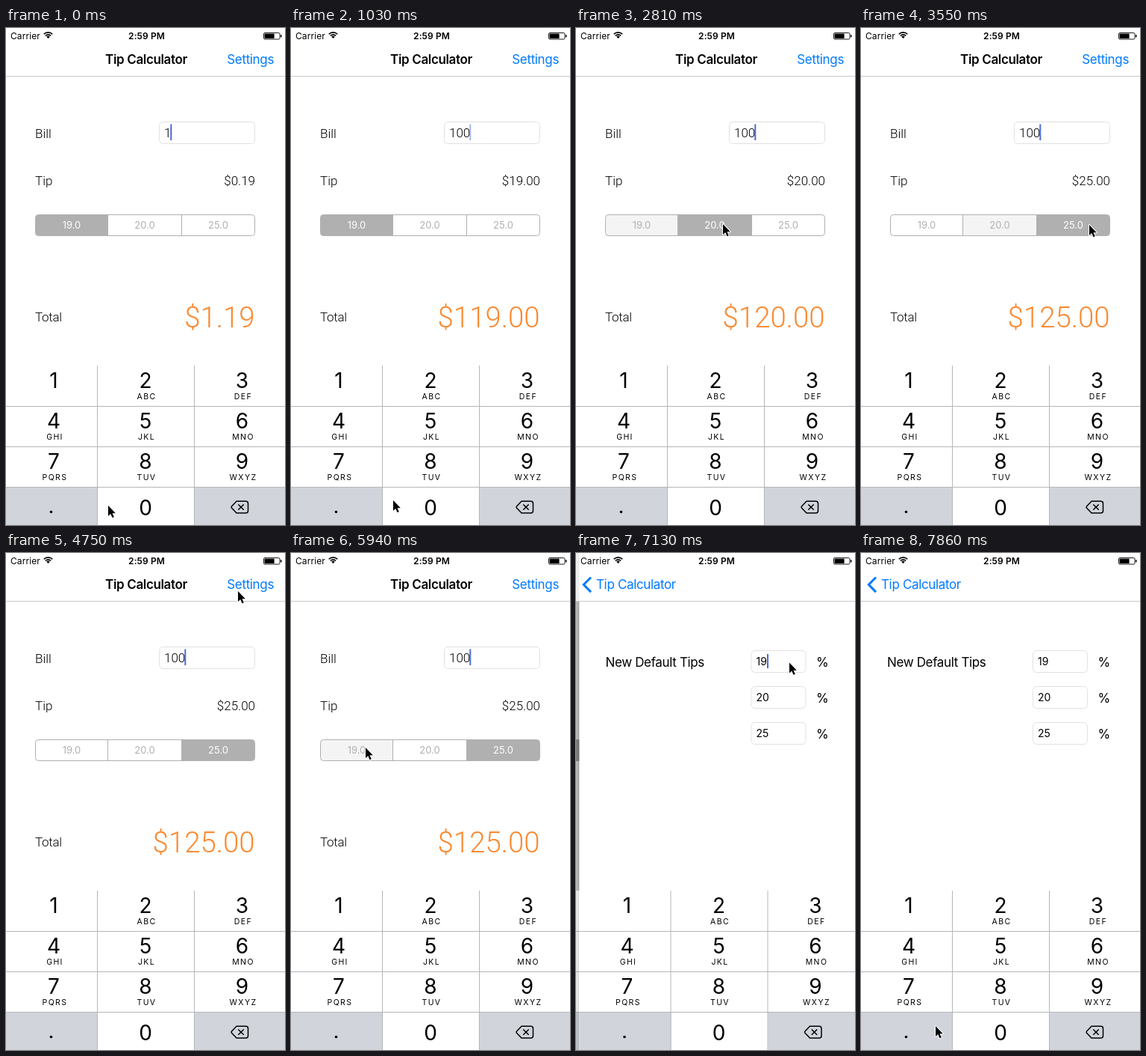
These frames come from a looping animation (374 px wide and 664 px high, 8 s). An HTML page:

```html
<!DOCTYPE html>
<html lang="en">
<head>
<meta charset="utf-8">
<title>Tip Calculator</title>
<style>
html, body { margin: 0; width: 100%; height: 100%; overflow: hidden; background: #fff; }
svg { display: block; width: 374px; height: 664px; }
text { font-family: Inter, sans-serif; white-space: pre; }
.nav { font-size: 17px; letter-spacing: -.35px; }
.bold { font-weight: 600; }
.status { font-size: 12px; letter-spacing: .1px; }
.thin { font-family: Roboto, sans-serif; font-weight: 300; font-size: 17px; }
.total { font-size: 38.4px; fill: #fa8a32; }
.seg { font-size: 13px; }
.key { font-size: 28px; }
.abc { font-size: 10.5px; letter-spacing: 1.4px; }
.small { font-size: 14px; }
.mid { text-anchor: middle; }
.end { text-anchor: end; }
</style>
</head>
<body>
<svg id="stage" viewBox="0 0 374 664" xmlns="http://www.w3.org/2000/svg"></svg>
<script>
const stage = document.getElementById('stage');
const W = 374, H = 664, LOOP = 8000, TICK = 148.3, LAST = 53;
const BLUE = '#007aff', GRAY = '#b0b0b0', KEY = '#d1d4db', PALE = '#f4f4f4';
const PUSH = 6757, STIFF = .01777;

// Pointer stops: tick, x, y
const stops = [
  [0, 137, 638], [2, 137, 631], [10, 137, 631], [11, 142, 600], [13, 168, 430],
  [15, 204, 279], [17, 197, 262], [19, 197, 262], [22, 300, 263], [24, 306, 263],
  [25, 306, 263], [28, 124, 262], [29, 124, 262], [32, 311, 51], [34, 349, 39],
  [36, 349, 39], [39, 100, 260], [41, 100, 260], [44, 324.5, 36], [46, 324.5, 36],
  [48, 286, 146.5], [53, 100, 632]
];
const rates = [19, 20, 25];
// Selections: tick, segment
const picks = [[0, 0], [18, 1], [23, 2], [41, 0]];

const clamp = v => Math.max(0, Math.min(1, v));
const text = (x, y, s, cls, extra = '') =>
  `<text x="${x}" y="${y}" class="${cls}" ${extra}>${s}</text>`;
const rect = (x, y, w, h, fill, extra = '') =>
  `<rect x="${x}" y="${y}" width="${w}" height="${h}" fill="${fill}" ${extra}/>`;
const path = (d, extra) => `<path d="${d}" ${extra}/>`;
const shift = (x, body) => `<g transform="translate(${x} 0)">${body}</g>`;
const field = (x, y, w) => rect(x, y, w, 29, '#fff', 'rx="5" stroke="#e1e1e1"');
const caret = (x, y, h, a) => rect(x, y, 2, h, '#4a6ad8', `opacity="${a}"`);

function pointer(k) {
  const i = Math.max(1, stops.findIndex(s => s[0] >= k));
  const [t0, x0, y0] = stops[i - 1], [t1, x1, y1] = stops[i];
  const u = (k - t0) / (t1 - t0);
  const at = `transform="translate(${x0 + (x1 - x0) * u} ${y0 + (y1 - y0) * u})"`;
  return path('M0 0V14L3.2 11L5.5 16.3L7.8 15.3L5.5 10.2H9.8Z',
    at + ' fill="#000" stroke="#fff" stroke-width="2" stroke-linejoin="round" paint-order="stroke"');
}

function keyboard(pressed) {
  const abc = ['', 'ABC', 'DEF', 'GHI', 'JKL', 'MNO', 'PQRS', 'TUV', 'WXYZ'];
  const cols = [64, 187, 316.5];
  let s = rect(0, 451, W, 213, '#fff') + rect(0, 614, 123, 50, KEY) + rect(253, 614, 121, 50, KEY);
  if (pressed) s += rect(123, 614, 130, 50, KEY);
  abc.forEach((label, i) => {
    const x = cols[i % 3], y = 480 + 54 * Math.floor(i / 3);
    s += text(x, y + .5, i + 1, 'key mid') + text(x + 1.5, y + 16, label, 'abc mid');
  });
  s += text(187, 650.5, 0, 'key mid') + `<circle cx="60.5" cy="646.5" r="1.8"/>`;
  s += path('M122.5 451V664M252.5 451V664M0 505.5H374M0 559.5H374M0 613.5H374',
    'stroke="#b4b6b9" fill="none"');
  s += path('M309 632.2H321.5Q324.5 632.2 324.5 635.2V645Q324.5 648 321.5 648H309L302.3 640.9Q301.8 640.1 302.3 639.3ZM311.3 636.5L318.7 643.7M318.7 636.5L311.3 643.7',
    'fill="none" stroke="#000" stroke-width="1.5" stroke-linejoin="round"');
  return s;
}

function shade(i, k, now) {
  const [start, seg] = picks[now], next = picks[now + 1];
  if (i === seg) return GRAY;
  if (now && i === picks[now - 1][1]) {
    if (k === start) return GRAY;
    if (k - start < 3) return PALE;
  }
  return next && next[1] === i && next[0] - k === 1 ? PALE : '#fff';
}

function segments(k, now) {
  const edges = [39.5, 136.5, 235.5, 333.5];
  let s = '<clipPath id="pill"><rect x="39.5" y="249.5" width="294" height="28" rx="4"/></clipPath>';
  let labels = '';
  rates.forEach((r, i) => {
    const fill = shade(i, k, now), x = edges[i], w = edges[i + 1] - x;
    s += rect(x, 249.5, w, 28, fill, 'clip-path="url(#pill)"');
    labels += text(x + w / 2, 268.3, r.toFixed(1), 'seg mid', `fill="${fill === GRAY ? '#fff' : GRAY}"`);
  });
  return s + rect(39.5, 249.5, 294, 28, 'none', `rx="4" stroke="${GRAY}"`)
    + path('M136.5 250V277M235.5 250V277', `stroke="${GRAY}"`) + labels;
}

function blink(k) {
  if (k < 7) return 1;
  if (k > 44) return 0;
  const phase = (k * TICK / 1000 - 1.03) % 1;
  return phase < .1 ? .5 : phase < .5 ? 0 : 1;
}

function calculator(k) {
  const digits = Math.min(3, k + 1), bill = 10 ** (digits - 1);
  const now = picks.filter(p => p[0] <= k).length - 1;
  const tip = bill * rates[picks[now][1]] / 100;
  return text(39, 147, 'Bill', 'thin') + text(39, 210, 'Tip', 'thin')
    + text(39, 392, 'Total', 'thin', 'letter-spacing="-.3"')
    + field(205.5, 125.5, 128) + text(212, 146, bill, 'thin')
    + caret(210.8 + 9.5 * digits, 128.5, 21.5, blink(k))
    + text(334, 210, '$' + tip.toFixed(2), 'thin end')
    + segments(k, now)
    + text(333.5, 399.7, '$' + (bill + tip).toFixed(2), 'thin total end');
}

function settings(k) {
  let s = rect(0, 0, W, H, '#fff') + text(35, 151.5, 'New Default Tips', 'nav');
  rates.forEach((r, i) => {
    const y = 130.5 + 48 * i;
    s += field(230.5, y, 73) + text(237, y + 19.5, r, 'small') + text(317.5, y + 21, '%', 'nav');
  });
  s += caret(251.5, 135, 19, k < 50 ? 1 : k < 51 ? .5 : 0);
  return s + (k > 46 ? keyboard(false) : '');
}

function statusBar() {
  const wave = r => `M${56.5 - r * .72} ${14 - r * .72}A${r} ${r} 0 0 1 ${56.5 + r * .72} ${14 - r * .72}`;
  return text(6, 14.5, 'Carrier', 'status') + text(188.5, 14.5, '2:59 PM', 'status bold mid')
    + path(wave(8) + wave(5), 'fill="none" stroke="#000" stroke-width="1.7"')
    + path('M56.5 14L54.2 11.6A3.2 3.2 0 0 1 58.8 11.6Z', '')
    + rect(345.5, 6.5, 21.5, 8.5, 'none', 'rx="1.5" stroke="#000" stroke-width=".9"')
    + rect(346.6, 7.6, 13, 6.3, '#000') + rect(368, 9, 1.5, 3.5, '#000', 'rx=".7"');
}

function navBar(k, p) {
  const name = 'Tip Calculator';
  const link = k < 44 ? 1 : Math.min(.3, clamp(1 - 3 * p));
  let s = path('M0 64.5H374', 'stroke="#c9c9c9"');
  s += text(188 - 107 * p ** 1.22, 48, name, 'nav bold mid', `opacity="${clamp(1 - 1.75 * p)}"`);
  s += text(359, 48, 'Settings', 'nav end', `fill="${p ? '#888' : BLUE}" opacity="${link}"`);
  if (p) {
    s += path('M20 32.5L10.3 42.3L20 52.1',
      `fill="none" stroke-width="3" stroke="${p < .5 ? '#888' : BLUE}" opacity="${clamp(p < .5 ? p / 3 : p)}"`);
    s += text(27, 48, name, 'nav', `fill="${BLUE}" opacity="${clamp((p - .4) * 2)}"`);
  }
  return s;
}

function draw(k) {
  // Critically damped spring drives the screen push
  const wt = Math.max(0, k * TICK - PUSH) * STIFF;
  const spring = W * (1 + wt) * Math.exp(-wt);
  const left = spring < 1 ? 0 : Math.round(spring * 2) / 2;
  const p = 1 - left / W, back = Math.round(-.3 * (W - left));
  let s = rect(0, 0, W, H, '#fff') + shift(back, calculator(k));
  if (p) {
    s += rect(0, 0, left - 7, 65, '#000', `opacity="${.07 * p}"`.replace('-', ''))
      .replace(/width="-[\d.]+"/, 'width="0"');
    s += rect(0, 65, W, 386, '#000', `opacity="${.11 * p}"`);
  }
  s += shift(back, keyboard(k === 1 || k === 2));
  if (p) {
    const edge = (y, h, a) => rect(left - 5, y, 5, h, 'url(#edge)', `opacity="${a}"`);
    s += '<linearGradient id="edge"><stop stop-opacity=".14"/><stop offset="1" stop-opacity=".3"/></linearGradient>';
    s += edge(0, 65, .3 * p) + edge(65, 386, 1) + edge(451, 213, .5) + shift(left, settings(k));
  }
  stage.innerHTML = s + navBar(k, p) + statusBar() + pointer(k);
}

let shown = -1;
function frame(now) {
  const k = Math.min(LAST, Math.floor((now % LOOP + 12) / TICK));
  if (k !== shown) draw(shown = k);
  requestAnimationFrame(frame);
}
draw(0);
requestAnimationFrame(frame);
</script>
</body>
</html>
```
